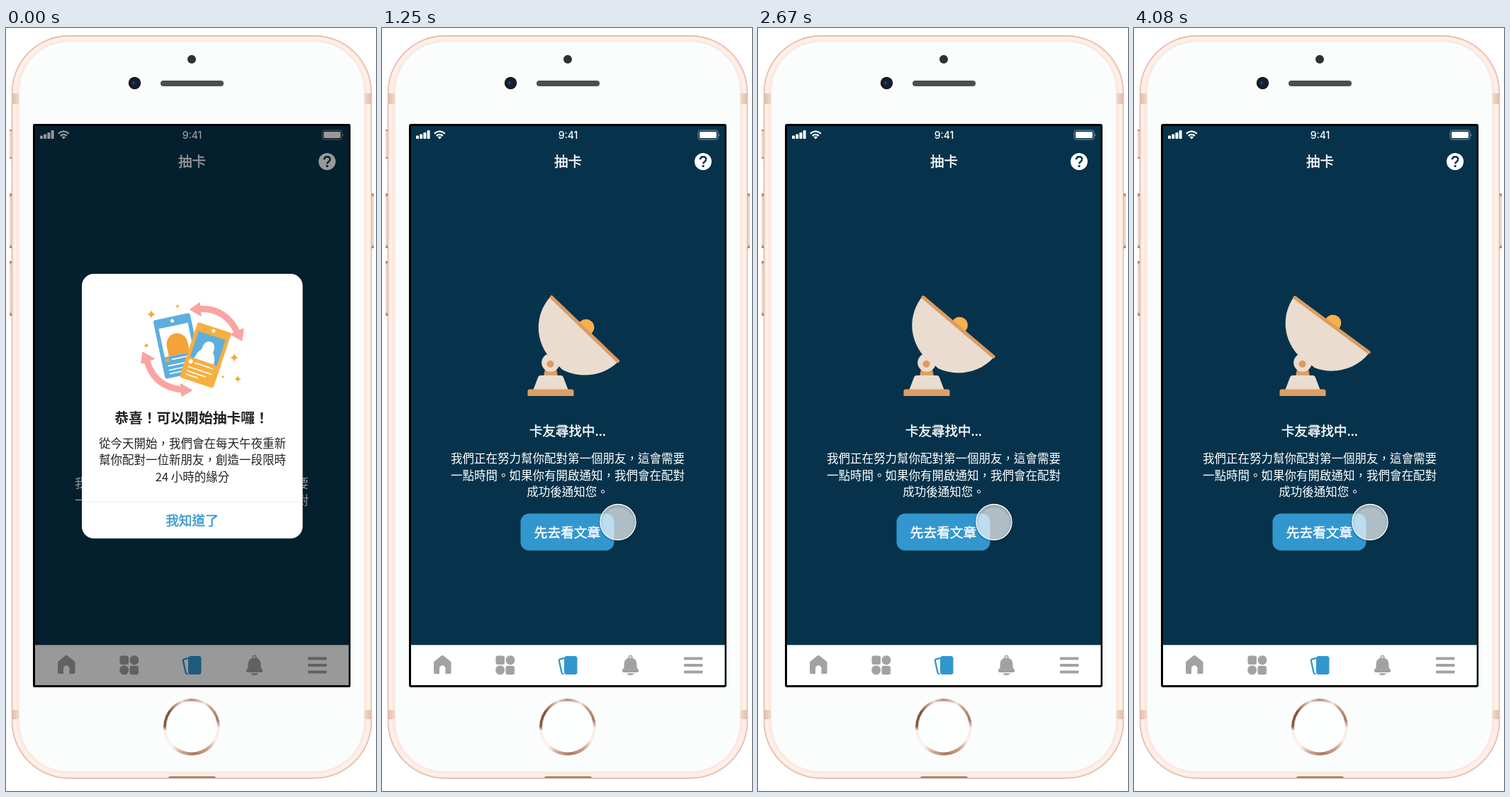
Write an HTML page that moves like this. It is 522x1074 px and loops after 4170 ms.

```html
<!DOCTYPE html>
<html lang="zh-Hant">
<head>
<meta charset="utf-8">
<title>抽卡</title>
<style>
  html, body { margin: 0; width: 100%; height: 100%; overflow: hidden; background: #fff; }
  svg { display: block; width: 100vw; height: 100vh; }
  text {
    font-family: "Noto Sans CJK TC", "Noto Sans TC", "Noto Sans CJK", sans-serif;
    text-anchor: middle; fill: #fff;
  }
  .latin { font-family: Inter, Roboto, sans-serif; font-weight: 500; }
  .medium { stroke: #fff; stroke-width: .45px; }
  .copy { font-size: 16.5px; }
  .dark text { fill: #222; }
  .dark .action { fill: #3896cb; stroke: #3896cb; }
  .ring {
    width: 80px; height: 80px; border-radius: 50%;
    background: conic-gradient(#b98b74, #d9b8a6 15deg, #f6e9e2 28deg, #c79c86 45deg, #a87962 75deg,
      #f8efea 92deg, #f8efea 120deg, #c99f89 145deg, #a97a62 175deg, #d3ad99 205deg,
      #fbf5f1 225deg, #f8ece5 262deg, #8a5a44 272deg, #84543e 305deg, #c79f8a 325deg, #eedcd2 338deg, #b98b74);
  }
</style>
</head>
<body>
<svg viewBox="0 0 522 1074">
  <defs>
    <linearGradient id="metal" x2="0" y2="1">
      <stop offset="0" stop-color="#7d5745"/><stop offset=".07" stop-color="#f3d7c8"/>
      <stop offset=".93" stop-color="#f3d7c8"/><stop offset="1" stop-color="#7d5745"/>
    </linearGradient>
    <linearGradient id="band">
      <stop offset="0" stop-color="#dfb9a5"/><stop offset="1" stop-color="#f3ddd1"/>
    </linearGradient>
    <filter id="soft" x="-30%" y="-30%" width="160%" height="160%" color-interpolation-filters="sRGB">
      <feDropShadow dx="0" dy="1.5" stdDeviation="1.5" flood-opacity=".4"/>
    </filter>
    <path id="star" d="M0-6Q1-1 6 0Q1 1 0 6Q-1 1-6 0Q-1-1 0-6Z" fill="#f5aa3e"/>
  </defs>

  <!-- Phone -->
  <g fill="url(#metal)">
    <rect x="5" y="143" width="5" height="41" rx="2"/>
    <rect x="5" y="233" width="5" height="77" rx="2"/>
    <rect x="5" y="328" width="5" height="77" rx="2"/>
    <rect x="514" y="233" width="5" height="77" rx="2"/>
  </g>
  <rect x="8.5" y="11" width="507" height="1045" rx="80" fill="#fdebe2" stroke="#deb39c" stroke-width="1.3"/>
  <rect x="13" y="15" width="498" height="1037" rx="76" fill="none" stroke="#fff3ec" stroke-width="2"/>
  <g fill="url(#band)">
    <rect x="8" y="92" width="11" height="15"/>
    <rect x="8" y="960" width="11" height="13"/>
    <rect x="-516" y="92" width="11" height="15" transform="scale(-1 1)"/>
    <rect x="-516" y="960" width="11" height="13" transform="scale(-1 1)"/>
  </g>
  <rect x="18.5" y="19" width="487" height="1028" rx="70" fill="#fafdfc" stroke="#f6e4da"/>
  <path d="M229 1055.5q0-2 3-2h61q3 0 3 2z" fill="#8d6a5a"/>
  <circle cx="262" cy="44" r="6" fill="#303132"/>
  <circle cx="181.5" cy="77.5" r="8.7" fill="#1b1b20"/>
  <circle cx="181.5" cy="77.5" r="4.5" fill="#10233f"/>
  <circle cx="180" cy="77" r="1.5" fill="#24538c"/>
  <rect x="218" y="74" width="89" height="8" rx="4" fill="#4d4f4f"/>
  <foreignObject x="222" y="943.5" width="80" height="80"><div class="ring"></div></foreignObject>
  <circle cx="262" cy="983.5" r="36" fill="#fdfefe"/>

  <!-- Screen -->
  <rect x="38" y="135" width="448" height="793" rx="3"/>
  <rect x="41" y="138" width="442.5" height="787" fill="#06334b"/>
  <g fill="#fff">
    <rect x="48" y="151.5" width="4" height="4.5" rx="1"/>
    <rect x="53.2" y="149.5" width="4" height="6.5" rx="1"/>
    <rect x="58.4" y="147" width="4" height="9" rx="1"/>
    <rect x="63.6" y="144" width="4" height="12" rx="1"/>
    <path d="M81.3 156.5l-2.8-3q2.8-2 5.6 0z"/>
    <path d="M73.8 148.6q7.5-6.6 15 0M76.7 151.8q4.6-4 9.2 0" fill="none" stroke="#fff" stroke-width="2.2"/>
    <rect x="446" y="144" width="28" height="13" rx="3.5" fill="none" stroke="#fff" opacity=".5"/>
    <rect x="448" y="146" width="24" height="9" rx="2"/>
    <path d="M475.3 148.5q1.8 2 0 4z" opacity=".6"/>
    <circle cx="453" cy="188" r="12"/>
  </g>
  <path d="M449 185.2q.2-4 4-4 4.2 0 4.2 3.6 0 2-2 3.4-2 1.3-2 3" fill="none" stroke="#06334b" stroke-width="2.5"/>
  <circle cx="453.1" cy="194.3" r="1.6" fill="#06334b"/>
  <text class="latin" x="262.5" y="155.5" font-size="14">9:41</text>
  <text class="medium" x="262.5" y="195.3" font-size="19.5">抽卡</text>

  <!-- Radar dish -->
  <g fill="#eaddcf">
    <path d="M230 480h16l2 10h-20z" fill="#dc9f66"/>
    <path d="M224 489h28q3 0 4 3l6.5 17h-49l6.5-17q1-3 4-3z"/>
    <path d="M205.5 518v-6.5q0-3 3-3h59q3 0 3 3v6.5z" fill="#dc9f66"/>
    <circle cx="238" cy="471" r="12.8"/>
    <g id="dish">
      <circle cx="288" cy="421.5" r="11.5" fill="#f8b04c"/>
      <path d="M238 378C218 400 215 432 232 458L254 480.5C278 494 312 491 333 470Z"/>
      <path d="M239.5 379L332.5 469" stroke="#dc9c62" stroke-width="5" stroke-linecap="round"/>
      <path id="wave" d="M297.5 391A21 21 0 0 1 322.5 416" transform="rotate(-1.5 237.5 473)" fill="none" stroke="#6f9fd6" stroke-width="3" stroke-linecap="round"/>
    </g>
    <circle cx="237.5" cy="473" r="5" fill="#dc9c62"/>
  </g>

  <g id="message">
    <text class="medium" x="262" y="574" font-size="18.5">卡友尋找中...</text>
    <g class="copy">
      <text x="262" y="612.2">我們正在努力幫你配對第一個朋友，這會需要</text>
      <text x="262" y="635.8">一點時間。如果你有開啟通知，我們會在配對</text>
      <text x="262" y="659.4">成功後通知您。</text>
    </g>
  </g>
  <g id="button">
    <rect x="195.5" y="683.5" width="132" height="52" rx="12" fill="#3397cf"/>
    <text class="medium" x="261.5" y="717" font-size="18.7">先去看文章</text>
  </g>

  <!-- Tab bar -->
  <rect x="41" y="868.5" width="442.5" height="56.5" fill="#fff"/>
  <g fill="#a2a2a2">
    <path d="M83.5 883.7q1.7-1.4 3.4 0l9.5 7.6q1.1 1 1.1 2.5v13.7q0 1.5-1.5 1.5h-6.5v-7.5a4 4 0 0 0-8.5 0v7.5h-6.5q-1.5 0-1.5-1.5v-13.7q0-1.5 1.1-2.5z"/>
    <rect x="160.5" y="883.5" width="12.5" height="12.5" rx="3"/>
    <circle cx="181" cy="889.8" r="6.5"/>
    <circle cx="166.7" cy="903.8" r="6.5"/>
    <rect x="174.5" y="897.8" width="12.5" height="12.5" rx="3"/>
    <circle cx="350.5" cy="885.7" r="2.3" fill="none" stroke="#a2a2a2" stroke-width="1.5"/>
    <path d="M350.5 886.5q9 0 9 9.5v4l2.4 3.5q1.1 3.5-2.4 3.5h-18q-3.5 0-2.4-3.5l2.4-3.5v-4q0-9.5 9-9.5z"/>
    <path d="M345 908.3h11q-1.5 2.7-5.5 2.7t-5.5-2.7z"/>
    <rect x="426" y="885.5" width="26.5" height="4" rx="1"/>
    <rect x="426" y="895" width="26.5" height="4" rx="1"/>
    <rect x="426" y="904.5" width="26.5" height="4" rx="1"/>
  </g>
  <rect x="257" y="884" width="18.5" height="26" rx="3.5" fill="#3397cf"/>
  <path d="M257 887l-5.5 1.3q-2 .5-1.6 2.5l3.6 16.5q.5 2 3 1.7" fill="none" stroke="#3397cf" stroke-width="2.3"/>

  <g id="touch">
    <circle cx="333" cy="695.5" r="25" fill="#fff" fill-opacity=".68"/>
    <circle cx="333" cy="695.5" r="25" fill="none" stroke="#fff" stroke-width="1.3" filter="url(#soft)"/>
  </g>
  <rect id="dim" x="38" y="135" width="448" height="793" opacity=".4"/>

  <!-- Dialog -->
  <g id="dialog" class="dark">
    <rect x="107" y="346" width="311.5" height="372.5" rx="17" fill="#fff"/>
    <g transform="translate(242 447.5) rotate(-12)">
      <rect x="-26.5" y="-42" width="53" height="84" rx="3" fill="#5eaedd"/>
      <circle cy="-36" r="2.5" fill="#fff"/>
      <rect x="-21" y="-29" width="42" height="41" fill="#fff"/>
      <path d="M-15 12v-14a15 16 0 0 1 30 0v14z" fill="#f4a23a"/>
      <circle cx="-18" cy="17" r="3" fill="#f4a23a"/>
      <path d="M-12 17h25M-19 25h34M-19 31h27M-19 36h18" stroke="#fff" stroke-width="1.6"/>
    </g>
    <g transform="translate(281.5 460.5) rotate(18.5)">
      <rect x="-25" y="-41" width="50" height="82" rx="3" fill="#f7af40"/>
      <circle cy="-36" r="2.5" fill="#fff"/>
      <rect x="-20" y="-29" width="40" height="38" fill="#5eaedd"/>
      <path d="M-14 9q2-11 6-15 0-14 9-14t8 14q6 5 6 15z" fill="#fff"/>
      <circle cx="-17" cy="15" r="3" fill="#fff"/>
      <path d="M-11 15h27M-18 23h35M-18 29h28M-18 34h18" stroke="#fff" stroke-width="1.6"/>
    </g>
    <g fill="#faa3a3" stroke="#faa3a3" stroke-linejoin="round">
      <path d="M271 395.5Q310 393 327 430M199 469Q210 506 249 509" fill="none" stroke-width="9"/>
      <path d="M260 396l13-9 2 18zM317 431l18-7.5-2.5 16zM193 456.5l-2 15.5 18-6.5zM262 510l-15.5-9 1.5 17z" stroke-width="1.5"/>
    </g>
    <use href="#star" x="205" y="403"/>
    <use href="#star" transform="translate(242 391.5) scale(.5)"/>
    <use href="#star" transform="translate(198 447) scale(.65)"/>
    <use href="#star" x="322" y="464"/>
    <use href="#star" transform="translate(327 494) scale(.85)"/>
    <use href="#star" transform="translate(306 491) scale(.4)"/>
    <text x="262" y="556" font-size="19.8" font-weight="700">恭喜！可以開始抽卡囉！</text>
    <g class="copy">
      <text x="263" y="590.5">從今天開始，我們會在每天午夜重新</text>
      <text x="263" y="614.3">幫你配對一位新朋友，創造一段限時</text>
      <text x="263" y="638.2">24 小時的緣分</text>
    </g>
    <path d="M107 667h311.5" stroke="#e6e9eb"/>
    <text class="medium action" x="262.5" y="700.3" font-size="18.7">我知道了</text>
  </g>
</svg>
<script>
  const LOOP = 4170, HOLD = 250, STEP = 83.2;
  const TOUCH_AT = 1160, CLOSE_AT = 1245;
  const SWING = 1600, LOWEST_AT = 2455, SWING_ANGLE = 8.1;

  const el = id => document.getElementById(id);
  const show = (id, visible) => el(id).style.display = visible ? '' : 'none';

  // Motion advances in steps of about a twelfth of a second.
  const stepped = t => t < HOLD ? 0 : HOLD + Math.floor((t - HOLD) / STEP) * STEP;

  function draw(time) {
    const t = stepped(time % LOOP);
    const closed = t >= CLOSE_AT;
    // The dish sweeps to and fro at constant speed, lowest at phase 0.
    const phase = ((t - LOWEST_AT) / SWING + 2) % 1;
    const angle = SWING_ANGLE * (1 - 4 * Math.abs(phase - 0.5));

    show('dialog', !closed);
    show('dim', !closed);
    show('button', closed);
    show('touch', t >= TOUCH_AT);
    show('wave', phase > 0.5 && phase < 0.76);
    el('message').setAttribute('transform', `translate(0 ${closed ? 0 : 35})`);
    el('dish').setAttribute('transform', `rotate(${angle} 237.5 473)`);
  }

  const start = performance.now();
  function frame() {
    draw(performance.now() - start);
    requestAnimationFrame(frame);
  }
  frame();
</script>
</body>
</html>
```
